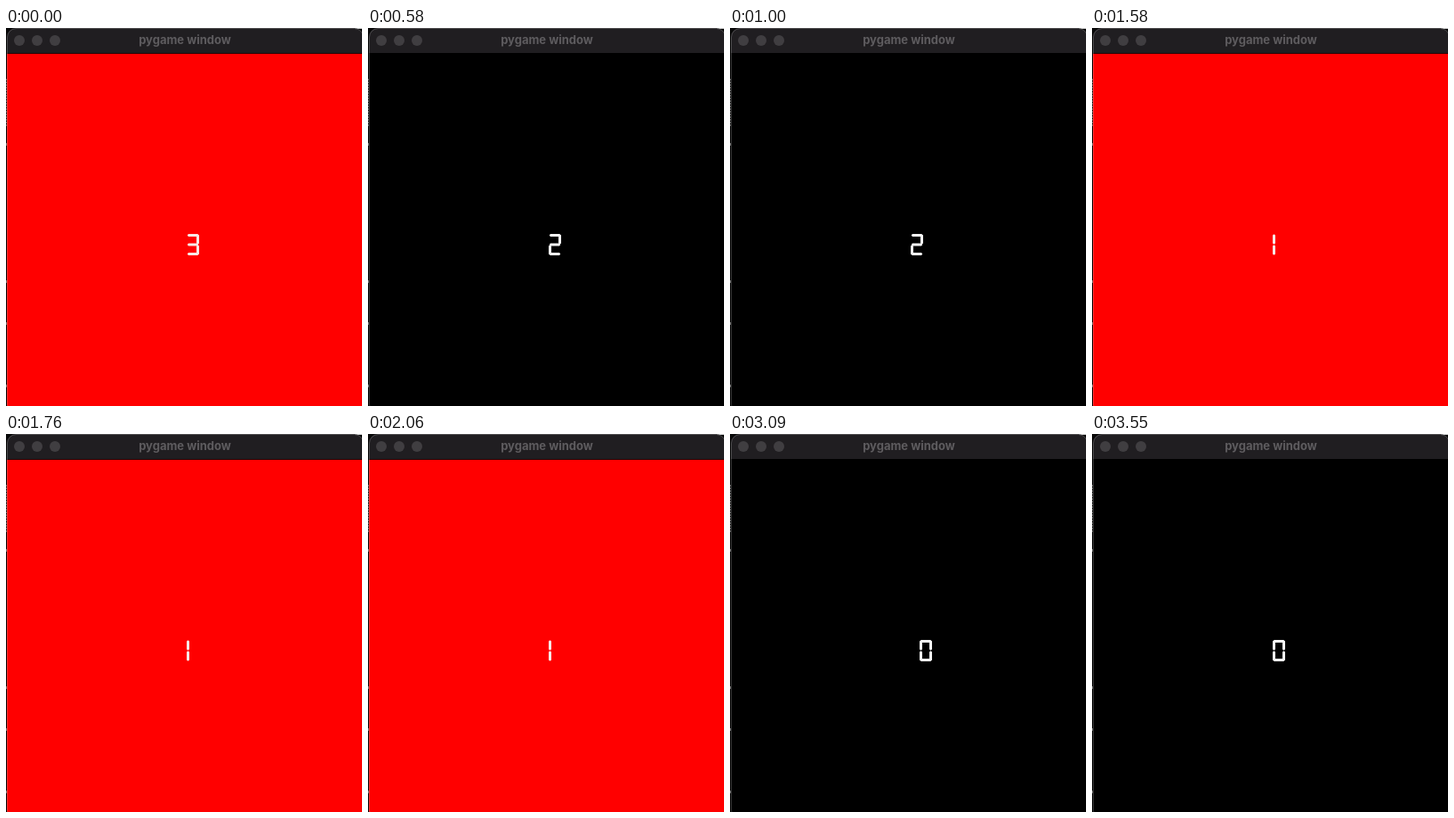
An HTML page with a canvas for the animation above (4.42 s loop, 400x424 px).

```html
<!DOCTYPE html>
<html lang="en">
<head>
<meta charset="utf-8">
<title>Countdown</title>
<style>
html, body { margin: 0; width: 100%; height: 100%; overflow: hidden; background: #000; }
canvas { display: block; }
</style>
</head>
<body>
<canvas id="stage" width="400" height="424"></canvas>
<script>
const ctx = document.getElementById('stage').getContext('2d');
const WIDTH = 400, HEIGHT = 424, BAR_HEIGHT = 28;
const LOOP = 4420, SECOND = 1000, FIRST_TICK = 580;
const ZERO_AT = 2610, SLOW_AT = 3150, SHAKE_END = 3550;
const SHAKE = 10;
const DIGIT = { x: 203, y: 231, width: 14, height: 24, thickness: 3 };
const SEGMENTS = ['abcdef', 'ef', 'abdeg', 'abcdg'];

function rect(x, y, w, h, color) {
  ctx.fillStyle = color;
  ctx.fillRect(x, y, w, h);
}

// A bar around a centre point, with bevelled ends.
function bar(cx, cy, length, vertical) {
  const half = DIGIT.thickness / 2, end = length / 2, bevel = end - half * 0.8;
  ctx.save();
  ctx.translate(cx, cy);
  if (vertical) ctx.rotate(Math.PI / 2);
  ctx.beginPath();
  ctx.moveTo(-end, 0);
  ctx.lineTo(-bevel, -half);
  ctx.lineTo(bevel, -half);
  ctx.lineTo(end, 0);
  ctx.lineTo(bevel, half);
  ctx.lineTo(-bevel, half);
  ctx.fill();
  ctx.restore();
}

function drawSegment(name) {
  const { width, height, thickness } = DIGIT;
  const row = 'agd'.indexOf(name);
  if (row >= 0) {
    bar(width / 2, thickness / 2 + row * (height - thickness) / 2, width - 1.5, false);
  } else {
    const x = 'bc'.includes(name) ? width - thickness / 2 : thickness / 2;
    const y = 'bf'.includes(name) ? height / 4 : height * 3 / 4;
    bar(x, y, height / 2 - 0.6, true);
  }
}

function drawDigit(digit, offset, color) {
  ctx.save();
  ctx.translate(DIGIT.x + offset, DIGIT.y);
  ctx.fillStyle = color;
  [...SEGMENTS[digit]].forEach(drawSegment);
  ctx.restore();
}

// Slivers of the desktop that show beside the window.
function drawDesktopEdge() {
  rect(0, 0, WIDTH, HEIGHT, '#080808');
  rect(WIDTH - 8, 0, 8, 1, '#d0d0d0');
  for (let y = 57; y < 111; y += 3) rect(0, y, 1, 2, '#606060');
  for (const y of [129, 283, 330, 400]) rect(0, y, 1, 3, '#707070');
}

function drawTitleBar() {
  rect(1, 0, WIDTH, BAR_HEIGHT, '#201e21');
  ctx.fillStyle = '#403e41';
  for (let x = 15; x <= 55; x += 20) {
    ctx.beginPath();
    ctx.arc(x, 14, 6, 0, Math.PI * 2);
    ctx.fill();
  }
  ctx.font = 'bold 13px Inter, sans-serif';
  ctx.textAlign = 'center';
  ctx.fillStyle = '#5e5c5f';
  ctx.fillText('pygame window', 201, 18);
}

function windowPath(inset) {
  ctx.beginPath();
  ctx.roundRect(1 + inset, inset, WIDTH, HEIGHT + 2, [10, 10, 4, 4]);
}

// The zero jumps sideways, quickly at first, then in a slower rhythm.
function shakeOffset(t) {
  if (t < ZERO_AT || t >= SHAKE_END) return 0;
  const step = t < SLOW_AT
    ? Math.min(12, Math.floor((t - ZERO_AT) / 40))
    : 13 + Math.floor((t - SLOW_AT) / 50);
  return step % 2 ? 0 : SHAKE;
}

function draw(t) {
  const digit = t < FIRST_TICK ? 3 : t < FIRST_TICK + SECOND ? 2 : t < ZERO_AT ? 1 : 0;
  const onRed = digit % 2 === 1;
  drawDesktopEdge();

  ctx.save();
  windowPath(0);
  ctx.clip();
  drawTitleBar();
  rect(1, BAR_HEIGHT, WIDTH, HEIGHT, onRed ? '#ff0000' : '#000000');
  if (onRed) rect(1, BAR_HEIGHT, WIDTH, 1, '#260506');
  drawDigit(digit, shakeOffset(t), onRed ? '#f8e8e5' : '#f8f8f8');
  ctx.restore();

  windowPath(0.5);
  ctx.strokeStyle = 'rgba(255, 255, 255, 0.2)';
  ctx.stroke();
}

function tick(now) {
  draw(now % LOOP);
  requestAnimationFrame(tick);
}

draw(0);
requestAnimationFrame(tick);
</script>
</body>
</html>
```
